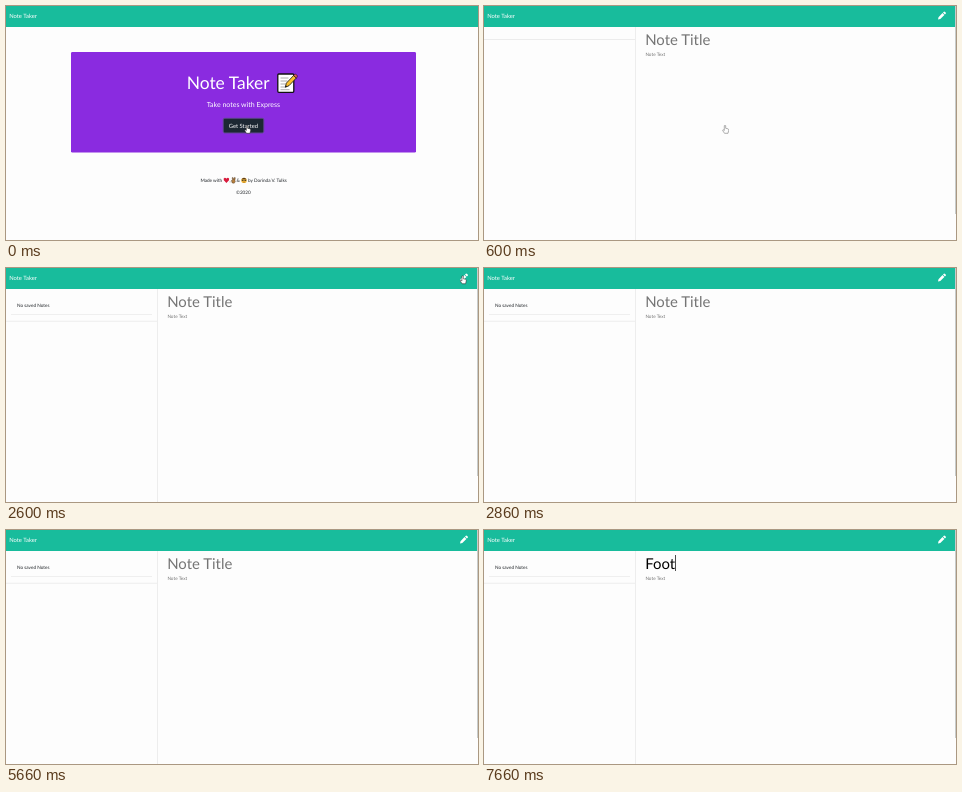
An HTML page that plays this animation: 472 by 234 pixels, repeating every 8000 ms.

```html
<!DOCTYPE html>
<html lang="en">
<head>
<meta charset="utf-8">
<title>Note Taker</title>
<style>
html, body { margin: 0; height: 100%; overflow: hidden; background: #fdfdfd; }
svg { display: block; width: 472px; height: 234px; font: 4.67px Lato, sans-serif; fill: #212529; text-rendering: geometricPrecision; }
.light { fill: #fff; }
.rule { fill: #e6e6e6; }
.hint { fill: #757575; }
.title { font-size: 14.93px; }
.brand { font-size: 5.83px; }
</style>
</head>
<body>
<svg viewBox="0 0 472 234">
  <rect width="472" height="234" fill="#fdfdfd"/>
  <rect width="472" height="21" fill="#18bc9c"/>
  <text class="light brand" x="3.2" y="11.8">Note Taker</text>

  <g id="home">
    <rect x="65" y="46" width="345" height="100.6" rx="1.4" fill="#8a2be0"/>
    <text class="light" x="180.7" y="83.2" font-size="17.4">Note Taker</text>
    <g transform="translate(271 67)">
      <rect x=".8" y="1" width="16" height="18.3" rx="1" fill="#fff" stroke="#111" stroke-width="1.3"/>
      <path d="M3.5 5h8M3.5 8h7M3.5 11h5M3.5 14h4.5M3.5 16.7h9" stroke="#999" stroke-width=".8"/>
      <path d="M8.3 14.3 9.3 10.2 16.6 2.5 19.3 5 12 12.7z" fill="#fbc02d" stroke="#111" stroke-width=".8"/>
      <path d="M16.6 2.5 17.6 1.4Q18.6.8 19.6 1.8T20.2 4L19.3 5z" fill="#e8605a" stroke="#111" stroke-width=".6"/>
      <path d="M8.3 14.3 8.8 12.3 10.2 13.6z" fill="#111"/>
    </g>
    <text class="light" x="237.4" y="100.9" font-size="7" text-anchor="middle">Take notes with Express</text>
    <rect x="216.7" y="111.8" width="41.6" height="15.6" rx="1.8" fill="#4c5b6a" opacity=".6"/>
    <rect x="217.7" y="112.8" width="39.6" height="13.6" rx="1" fill="#1c2833"/>
    <text class="light brand" x="237.4" y="121.8" text-anchor="middle">Get Started</text>

    <text x="194.4" y="176">Made with</text>
    <path d="M220.4 177 217.8 174.2Q217.1 172 218.8 171.8 219.9 171.8 220.4 172.8 220.9 171.8 222 171.8 223.7 172 223 174.2z" fill="#d81b3c"/>
    <text x="223.5" y="176">,</text>
    <path d="M226.2 177 225.4 174.4 226.7 174 226.1 171.8 227 171.5 227.8 173.6 228.4 171.4 229.3 171.7 228.9 174.4 229.3 175.6 228.2 177.2z" fill="#b9813f" stroke="#3b2a18" stroke-width=".4"/>
    <text x="230.6" y="176">&amp;</text>
    <circle cx="238" cy="174.4" r="2.7" fill="#f5b93a"/>
    <path d="M235.4 173.3Q238 170 240.6 173.3z" fill="#5a3a1c"/>
    <path d="M235.8 174.3h1.7m1 0h1.7" stroke="#222" stroke-width="1.1"/>
    <path d="M236.8 175.9q1.2.9 2.4 0" fill="none" stroke="#6b3a12" stroke-width=".4"/>
    <text x="242" y="176">by Dorinda V. Tulks</text>
    <text x="237.4" y="187.9" text-anchor="middle">©2020</text>
  </g>

  <g id="notes">
    <rect class="rule" x="151" y="21" width=".7" height="213"/>
    <rect x="471" width="1" height="208" fill="#c8cccb"/>
    <rect id="bare" class="rule" y="33.2" width="151" height=".7"/>
    <g id="list">
      <text x="11" y="38.6">No saved Notes</text>
      <rect class="rule" x="5" y="46.2" width="141" height=".6"/>
      <rect class="rule" y="52.8" width="151" height=".7"/>
    </g>
    <text id="hint" class="hint title" x="161.2" y="38.5">Note Title</text>
    <text id="typed" class="title" x="161.2" y="38.5" fill="#000"></text>
    <rect id="caret" y="25" width=".7" height="16" fill="#000"/>
    <text class="hint" x="161.4" y="50.4">Note Text</text>
    <path class="light" d="M454 13.6 454.5 11.2 458.5 7.1 460.4 9 456.3 13.1zM459 6.6 459.8 5.8Q460.4 5.3 461 5.9L461.7 6.6Q462.2 7.2 461.7 7.7L460.9 8.5z"/>
  </g>

  <circle id="ring" r="10.4" fill="none" stroke="#d9403c" stroke-opacity=".65" stroke-width="1.2"/>
  <g id="cursor" fill="#fff" stroke="#222" stroke-width=".55" stroke-linejoin="round">
    <path id="hand" d="M-.7.4Q0-.3.7.4V3L3 3.5Q3.8 3.8 3.7 5L3 8H-.5L-2.3 5.3Q-2.3 4.2-1.4 4.6L-.7 5.2z"/>
    <path id="arrow" d="M0 0V6.8L1.6 5.4 2.7 8 3.9 7.5 2.8 5H5z"/>
  </g>
</svg>
<script>
const $ = id => document.getElementById(id);
const show = (id, on) => $(id).style.display = on ? "" : "none";
const LOOP = 8000;

// [time, value]: each value holds until the next one
const typing = [[0, ""], [6200, "F"], [7000, "Fo"], [7060, "Foo"], [7660, "Foot"]];
const caretOn = [[0, 0], [4060, 1], [4600, 0], [5200, 1], [5660, 0], [6200, 1], [6730, 0], [7000, 1]];
const alpha = [[0, 1], [600, .65], [1000, .35], [1060, 0], [1400, 1], [2860, 0]];
const clicks = [[0, null], [2460, [457, 10]], [2600, null], [4060, [176, 34]], [4260, null]];
const hold = (keys, t) => keys.filter(k => k[0] <= t).pop()[1];

// [time, x, y] of the pointer tip
const path = [[0, 241, 119.3], [1399, 241, 119.3], [1400, 424.5, -5], [1600, 424.5, -5],
  [2130, 456.8, 7.6], [2600, 456.8, 7.6], [2800, 418, 38.5], [LOOP, 418, 38.5]];

function pointer(t) {
  const i = path.findIndex(p => p[0] > t);
  const [a, b] = [path[i - 1], path[i]];
  const p = (t - a[0]) / (b[0] - a[0]);
  return [a[1] + (b[1] - a[1]) * p, a[2] + (b[2] - a[2]) * p];
}

function draw(t) {
  show("home", t < 600);
  show("notes", t >= 600);
  show("bare", t < 800);
  show("list", t >= 800);

  const text = hold(typing, t);
  if ($("typed").textContent !== text) $("typed").textContent = text;
  show("hint", !text);
  show("caret", hold(caretOn, t));
  $("caret").setAttribute("x", 161.2 + (text && t >= 600 ? $("typed").getComputedTextLength() : 0));

  const [x, y] = pointer(t);
  const overLink = t < 1400 || (x > 453 && y < 13);
  $("cursor").setAttribute("transform", `translate(${x} ${y})`);
  $("cursor").setAttribute("opacity", hold(alpha, t));
  show("hand", overLink);
  show("arrow", !overLink);

  const click = hold(clicks, t);
  show("ring", click);
  if (click) $("ring").setAttribute("transform", `translate(${click})`);
}

const start = performance.now();
function tick() {
  draw((performance.now() - start) % LOOP);
  requestAnimationFrame(tick);
}
tick();
</script>
</body>
</html>
```
